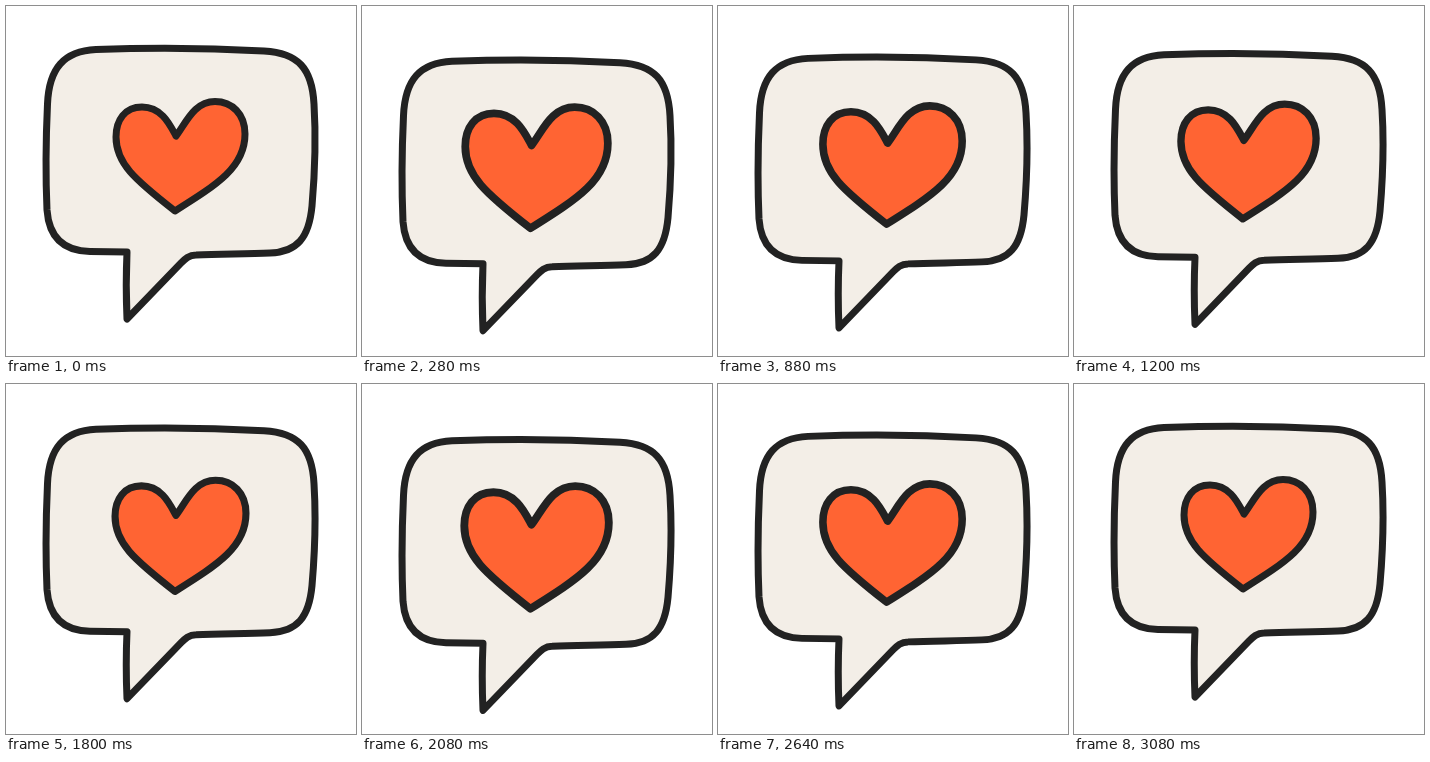
Animation, 350 px wide and 350 px high, one loop 3.36 s. Source, as an HTML page:

```html
<!DOCTYPE html>
<html lang="en">
<head>
<meta charset="utf-8">
<title>Heart bubble</title>
<style>
  html, body { margin: 0; width: 100%; height: 100%; overflow: hidden; background: #fff; }
  svg { display: block; width: 100%; height: 100%; }
  path { stroke: #222; stroke-width: 7; stroke-linejoin: round; }
</style>
</head>
<body>
<svg viewBox="0 0 350 350">
  <g id="bubble">
    <path fill="#f3eee7" d="M121 246 L84 245.5 C58 245 43 232 41 204 C39.5 170 40 130 41.5 98
      C43 62 58 45 90 43.5 C145 41.5 205 42 258 45 C292 47 306 62 308 98
      C310 130 309 165 306 200 C303 232 291 246 264 247 C240 248 215 248 190 249
      C183 249 179 253 175 257 L121 313 C120 290 120 268 121 246 Z"/>
    <path id="heart" fill="#ff6433" d="M170 130 C164 119 156 101 136 101 C119 101 110 114 110 131
      C110 157 128 173 169 205 C212 178 239 161 239 128
      C239 108 226 95.5 209 95.5 C188 95.5 180 117 170 130 Z"/>
  </g>
</svg>
<script>
  const LOOP = 3360, STEP = 40, SECOND_START = 1760;
  const DROP = 14.2, GROWTH = 0.128;
  const HEART_X = 174, HEART_Y = 152;
  // Turning points of one double beat: [time in ms, amount]
  const BEATS = [[0, 0], [340, 1], [680, 0], [1000, 1], [1320, 0]];

  const bubble = document.getElementById('bubble');
  const heart = document.getElementById('heart');

  function beatAt(time) {
    for (let i = 1; i < BEATS.length; i++) {
      const [t0, a] = BEATS[i - 1], [t1, b] = BEATS[i];
      if (time < t1) return a + (b - a) * (time - t0) / (t1 - t0);
    }
    return 0;
  }

  function draw(now) {
    const time = Math.floor((now % LOOP) / STEP) * STEP;
    const beat = beatAt(time % SECOND_START);
    const scale = 1 + GROWTH * beat;
    bubble.setAttribute('transform', `translate(0 ${DROP * beat})`);
    heart.setAttribute('transform',
      `translate(${HEART_X} ${HEART_Y}) scale(${scale}) translate(${-HEART_X} ${-HEART_Y})`);
  }

  const start = performance.now();
  function tick() {
    draw(performance.now() - start);
    requestAnimationFrame(tick);
  }
  tick();
</script>
</body>
</html>
```
